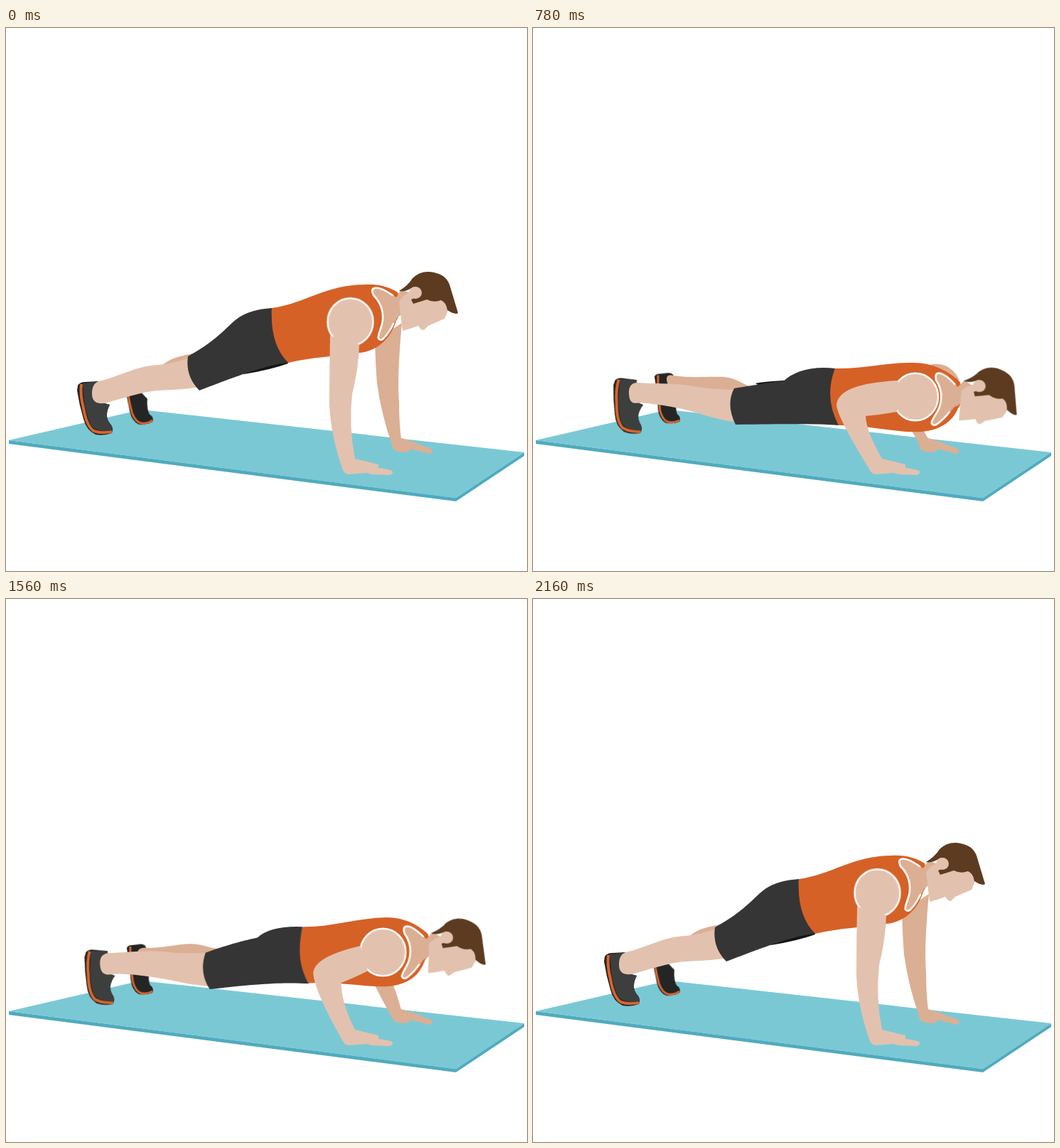
These frames come from a looping animation (733x764 px, 2400 ms). An HTML page without scripts:

```html
<!DOCTYPE html>
<html lang="en">
<head>
<meta charset="utf-8">
<title>Push-up</title>
<style>
html, body { margin: 0; width: 100%; height: 100%; overflow: hidden; background: #fff; }
svg { display: block; width: 100vw; height: 100vh; }

.skin { fill: #e2c2ae; }
.shade { fill: #dbaf93; }
.shirt { fill: #d56127; }
.cloth { fill: #353535; }
.trim { fill: none; stroke: #fff; stroke-width: 2.6; stroke-linecap: round; }
.stripe { fill: none; stroke: #d9652a; }

/* Poses: a plank, b lowering, c low, d floor, e lifting, f pressing.
   --a etc. hold outlines, --ta etc. hold transforms. */
.move { animation: pose 2.4s infinite; }
.sway { animation: sway 2.4s infinite; }

@keyframes pose {
  0% { d: var(--a); transform: var(--ta); }
  2.5% {
    d: var(--a); transform: var(--ta);
    animation-timing-function: linear(0 0% 20%, .04 20% 40%, .16 40% 60%, .36 60% 80%, .64 80% 100%);
  }
  15% {
    d: var(--b); transform: var(--tb);
    animation-timing-function: linear(0 0% 14.29%, .11 14.29% 28.57%, .237 28.57% 42.86%, .377 42.86% 57.14%, .525 57.14% 71.43%, .684 71.43% 85.71%, .844 85.71% 100%);
  }
  32.5% {
    d: var(--c); transform: var(--tc);
    animation-timing-function: linear(0 0% 25%, .338 25% 50%, .646 50% 75%, .877 75% 100%);
  }
  42.5% { d: var(--d); transform: var(--td); }
  50% {
    d: var(--d); transform: var(--td);
    animation-timing-function: linear(0 0% 33.33%, .168 33.33% 66.67%, .503 66.67% 100%);
  }
  57.5% {
    d: var(--e); transform: var(--te);
    animation-timing-function: linear(0 0% 14.29%, .135 14.29% 28.57%, .278 28.57% 42.86%, .424 42.86% 57.14%, .571 57.14% 71.43%, .717 71.43% 85.71%, .86 85.71% 100%);
  }
  75% {
    d: var(--f); transform: var(--tf);
    animation-timing-function: linear(0 0% 16.67%, .339 16.67% 33.33%, .602 33.33% 50%, .792 50% 66.67%, .914 66.67% 83.33%, .977 83.33% 100%);
  }
  90%, 100% { d: var(--a); transform: var(--ta); }
}

/* The trunk swings on an arc, so it leads a little mid-way. */
@keyframes sway {
  0%, 32.5%, 75%, 100% { transform: translateX(0); }
  15%, 57.5% { transform: translateX(0); animation-timing-function: steps(4); }
  25%, 67.5% { transform: translateX(5px); animation-timing-function: steps(3); }
}

#far-shoe {
  transform-origin: 206px 551px;
  --ta: rotate(-8deg); --tb: rotate(-4.5deg); --tc: rotate(-1deg);
  --td: rotate(0deg); --te: rotate(-.5deg); --tf: rotate(-4deg);
}
#shoe {
  transform-origin: 148px 570px;
  --ta: translate(0, 0) rotate(0deg); --tb: translate(0, 0) rotate(4deg);
  --tc: translate(2px, 0) rotate(10deg); --td: translate(2px, 0) rotate(11.4deg);
  --te: translate(2px, 0) rotate(10.8deg); --tf: translate(.5px, 0) rotate(4.8deg);
}
#head {
  transform-origin: 575px 372px;
  --ta: translate(0, 0) rotate(0deg); --tb: translate(15px, 27px) rotate(1.2deg);
  --tc: translate(52px, 131px) rotate(12deg); --td: translate(55px, 177px) rotate(14.7deg);
  --te: translate(54px, 151px) rotate(13.2deg); --tf: translate(22px, 39.5px) rotate(3.6deg);
}
#neck {
  transform-origin: 515px 367px;
  --ta: translate(0, 0) rotate(0deg); --tb: translate(15px, 24px) rotate(1.6deg);
  --tc: translate(52px, 119px) rotate(12.4deg); --td: translate(59px, 159px) rotate(17deg);
  --te: translate(55px, 136px) rotate(13.8deg); --tf: translate(22.5px, 37px) rotate(4deg);
}
#ring {
  --ta: translate(484.5px, 413.5px); --tb: translate(499px, 435px); --tc: translate(538px, 519px);
  --td: translate(542px, 555.5px); --te: translate(541px, 534.5px); --tf: translate(507px, 446px);
}
#far-leg {
  --a: path("M178 512C176 502 182 498 192 494C208 484 218 474 233 466C245 461 255 460 266 457L275 490C250 495 210 506 178 512Z");
  --b: path("M179 508C177 497 183 494 192 492C212 490 222 480 238 473C252 467 262 468 276 464L280 495C250 498 210 505 179 508Z");
  --c: path("M190 502C186 492 188 487 197 489C225 493 245 490 268 491C290 493 295 503 310 505L300 525C260 522 210 508 190 502Z");
  --d: path("M191 504C186 492 191 486 199 489C225 498 250 493 272 497C295 500 305 510 320 518L300 535C260 530 210 510 191 504Z");
  --e: path("M191 503C186 492 190 488 198 490C225 493 245 491 268 493C290 495 300 507 315 510L300 525C260 523 210 508 191 503Z");
  --f: path("M180 508C178 497 184 494 194 492C215 490 225 480 240 475C255 470 265 471 284 468L285 500C250 500 210 505 180 508Z");
}
#far-shorts {
  --a: path("M335 487Q372 481 397 472L390 455L340 470Z");
  --b: path("M340 480Q365 475 390 470L390 455L345 470Z");
  --c: path("M313 500Q320 498 352 496L380 505L330 510Z");
  --d: path("M313 519Q316 511 330 511L380 512L350 530Z");
  --e: path("M314 509Q317 505 330 505L372 501L340 515Z");
  --f: path("M345 485Q365 480 390 475L390 460L350 470Z");
}
#far-arm {
  --a: path("M519 440Q520 475 522 500Q528 545 545 592L556 578Q553 555 553 525Q550 490 557 415Z");
  --b: path("M520 470Q503 488 508 500Q517 540 545 592L556 578Q551 545 539 493Q548 475 562 440Z");
  --c: path("M545 500Q500 520 515 540Q530 560 547 592L556 578Q552 570 545 560Q570 520 600 500Z");
  --d: path("M545 530Q510 535 525 555Q535 575 545 592L556 578Q552 570 545 565Q570 550 600 540Z");
  --e: path("M545 520Q500 530 520 550Q535 570 545 592L556 578Q552 570 545 562Q570 540 600 520Z");
  --f: path("M518 480Q500 497 505 508Q514 545 545 592L556 578Q549 540 535 492Q545 480 565 450Z");
}
#far-shoulder {
  --a: path("M505 400Q510 385 520 380Q530 378 540 385Q545 390 548 400L520 420Z");
  --b: path("M520 425Q525 410 535 405Q545 403 553 410Q560 415 562 425L535 445Z");
  --c: path("M525 490Q535 478 558 474Q568 471 580 475Q592 480 600 495L545 505Z");
  --d: path("M498 508Q500 497 515 498Q550 501 570 506Q592 511 603 538L540 540Z");
  --e: path("M520 505Q530 490 560 488Q570 486 580 489Q595 496 602 516L545 520Z");
  --f: path("M525 437Q530 422 540 417Q550 415 558 422Q565 427 567 437L540 457Z");
}
#torso {
  --a: path("M374 394C420 388 450 361 505 361C525 360 540 365 551 372Q560 395 549 412C540 440 520 455 497 457C465 462 430 463 397 471Q367 445 374 394Z");
  --b: path("M388 412C430 408 465 384 515 383C540 383 555 390 566 396Q575 420 563 437C555 465 535 478 510 482C480 488 450 486 412 490Q380 465 388 412Z");
  --c: path("M425 479C465 480 500 470 535 471C565 471 585 484 600 497Q610 520 598 535C590 555 570 567 545 568C510 570 470 558 430 559Q406 520 425 479Z");
  --d: path("M432 507C470 515 505 508 545 509C575 510 595 527 608 540Q612 565 598 580C588 597 570 605 545 606C510 607 470 586 428 588Q410 555 432 507Z");
  --e: path("M428 491C465 496 505 487 540 487C570 487 590 503 603 517Q612 535 598 553C590 572 575 582 548 584C515 583 470 570 428 571Q408 535 428 491Z");
  --f: path("M394 421C435 416 470 397 520 395C545 395 560 402 571 408Q580 432 568 449C560 477 540 488 515 492C485 497 455 494 415 499Q385 475 394 421Z");
}
#leg {
  --a: path("M121 515C121 500 128 497 135 496C165 488 185 475 215 474Q240 472 270 459L284 503C240 512 215 507 190 514C165 520 150 525 146 526C135 530 121 530 121 515Z");
  --b: path("M125 515C123 502 130 499 136 497C165 492 185 485 218 483Q240 480 272 471L288 516C250 520 225 515 195 520C175 522 155 525 148 526C135 530 126 528 125 515Z");
  --c: path("M135 515C134 503 140 499 147 499C170 501 190 499 220 503Q250 509 292 509L292 555C255 552 230 539 200 534C180 530 160 528 153 527C140 529 136 528 135 515Z");
  --d: path("M137 514C136 504 141 499 150 499C170 502 190 500 222 507Q255 521 296 523L294 573C258 570 240 549 205 541C180 533 165 530 156 530C143 531 138 526 137 514Z");
  --e: path("M137 515C136 504 140 500 147 499C170 502 195 500 225 506Q255 515 293 515L295 562C255 558 235 546 205 538C180 531 162 528 154 528C142 530 138 527 137 515Z");
  --f: path("M126 515C125 502 131 499 138 497C165 492 185 486 220 483Q245 480 275 474L289 522C255 524 225 519 195 522C175 523 155 526 149 527C136 531 127 528 126 515Z");
}
#shorts {
  --a: path("M256 462C300 438 315 415 328 407Q345 396 374 394Q371 445 397 471C370 474 345 482 272 510Q252 490 256 462Z");
  --b: path("M264 472C310 448 320 445 332 436Q350 415 388 412Q384 465 412 490C385 489 365 494 277 521Q258 500 264 472Z");
  --c: path("M283 507C315 502 335 498 352 497Q378 474 425 479Q409 520 430 559C400 557 370 557 285 558Q271 530 283 507Z");
  --d: path("M288 521C315 520 335 519 360 518Q384 499 432 507Q414 555 428 588C400 586 380 577 284 573Q272 547 288 521Z");
  --e: path("M285 513C315 507 335 504 360 503Q380 486 428 491Q412 535 428 572C400 570 370 565 285 566Q272 540 285 513Z");
  --f: path("M266 477C315 453 325 450 337 440Q355 423 394 421Q389 475 415 499C388 499 365 504 280 526Q261 505 266 477Z");
}
#arm {
  --a: path("M456 433Q455 480 455 530Q457 575 474 622L491 606Q482 560 487 515Q496 480 497 445Z");
  --b: path("M468 447Q443 495 443 515Q443 560 474 622L491 606Q479 570 478 520Q485 505 503 469Z");
  --c: path("M514 496Q430 500 427 530Q428 548 474 622L491 606Q469 568 468 546Q490 544 512 540Z");
  --d: path("M524 527Q435 507 429 540Q433 562 474 622L491 606Q475 580 472 563Q490 567 511 573Z");
  --e: path("M517 510Q432 505 428 532Q430 552 474 622L491 606Q470 570 470 551Q490 553 512 556Z");
  --f: path("M474 458Q438 500 438 517Q438 550 474 622L491 606Q474 565 474 525Q485 508 505 479Z");
}
</style>
</head>
<body>
<svg viewBox="0 0 733 764">
  <path fill="#4fabbd" d="M4 580L633 661L729 597V602L633 666L4 585Z"/>
  <path fill="#7bc8d5" d="M4 580L190 537L729 597L633 661.5Z"/>

  <g id="far-shoe" class="move">
    <path fill="#242525" d="M172 490Q173 486 180 486L192 485Q200 486 199 492L195 510L203 521Q200 535 203 543Q209 548 206 554Q195 558 186 555Q177 549 176 535Q175 510 172 490Z"/>
    <path class="stripe" stroke-width="3" d="M177 488Q176 515 179 538Q182 551 190 554Q198 556 206 552"/>
  </g>
  <path id="far-leg" class="move shade"/>
  <path id="far-shorts" class="move" fill="#151515"/>
  <path id="far-arm" class="move shade"/>
  <path class="shade" d="M543 588L546 594L556 597L568 596L568 592L596 599Q602 597 598 592L572 582L556 577Z"/>

  <g class="sway">
    <path id="far-shoulder" class="move shade"/>
    <path id="torso" class="move shirt"/>
  </g>

  <g id="shoe" class="move">
    <path fill="#222" d="M101 503Q104 498 112 498L131 497L134 527L146 530Q138 546 146 556Q152 562 149 570Q138 574 126 572Q113 566 109 550Q103 530 100 510Z"/>
    <path class="stripe" stroke-width="4" d="M106 501Q104 515 109 535Q113 558 122 566Q130 571 149 568"/>
    <path fill="#3d3f3e" d="M108 500L131 497L135 527L146 530Q137 546 147 558Q151 562 149 566Q130 570 120 560Q113 545 110 525Z"/>
  </g>
  <path id="leg" class="move skin"/>

  <g class="sway">
    <path id="shorts" class="move cloth"/>
    <g id="neck" class="move">
      <path class="shade" d="M549 379Q525 363 518 366Q513 368 517 376C527 386 531 396 530 410C530 420 522 432 524 437Q528 441 532 436Q545 420 550 408L560 400L575 375L556 368Z"/>
      <path class="trim" d="M544 376Q525 363 518 366Q513 368 517 376C527 386 531 396 530 410C530 420 522 432 524 437Q528 441 532 436Q540 427 545 416"/>
    </g>
    <g id="head" class="move">
      <path class="skin" d="M558 426L553 385Q558 376 568 372L590 375L613 380L622 397Q620 402 617 409L594 419L588 425L584 424L580 419Q570 423 558 426Z"/>
      <path fill="#5d3b20" d="M553 370Q566 362 572 352Q582 342 596 343Q618 345 624 361L636 401Q632 404 621 397Q619 386 612 383Q602 387 592 382Q583 385 573 388L570 382L584 376Q584 362 572 365Q562 372 553 370Z"/>
      <ellipse class="skin" cx="576" cy="372.5" rx="9" ry="8.5"/>
    </g>
    <ellipse id="ring" class="move skin" rx="32" ry="33.3" stroke="#fff" stroke-width="2.4"/>
  </g>

  <path id="arm" class="move skin"/>
  <path class="skin" d="M472 616L474 622Q476 627 482 628L508 626L514 628L540 629Q545 627 544 624Q542 621 524 619L524 614L491 606L486 600Z"/>
</svg>
</body>
</html>
```
